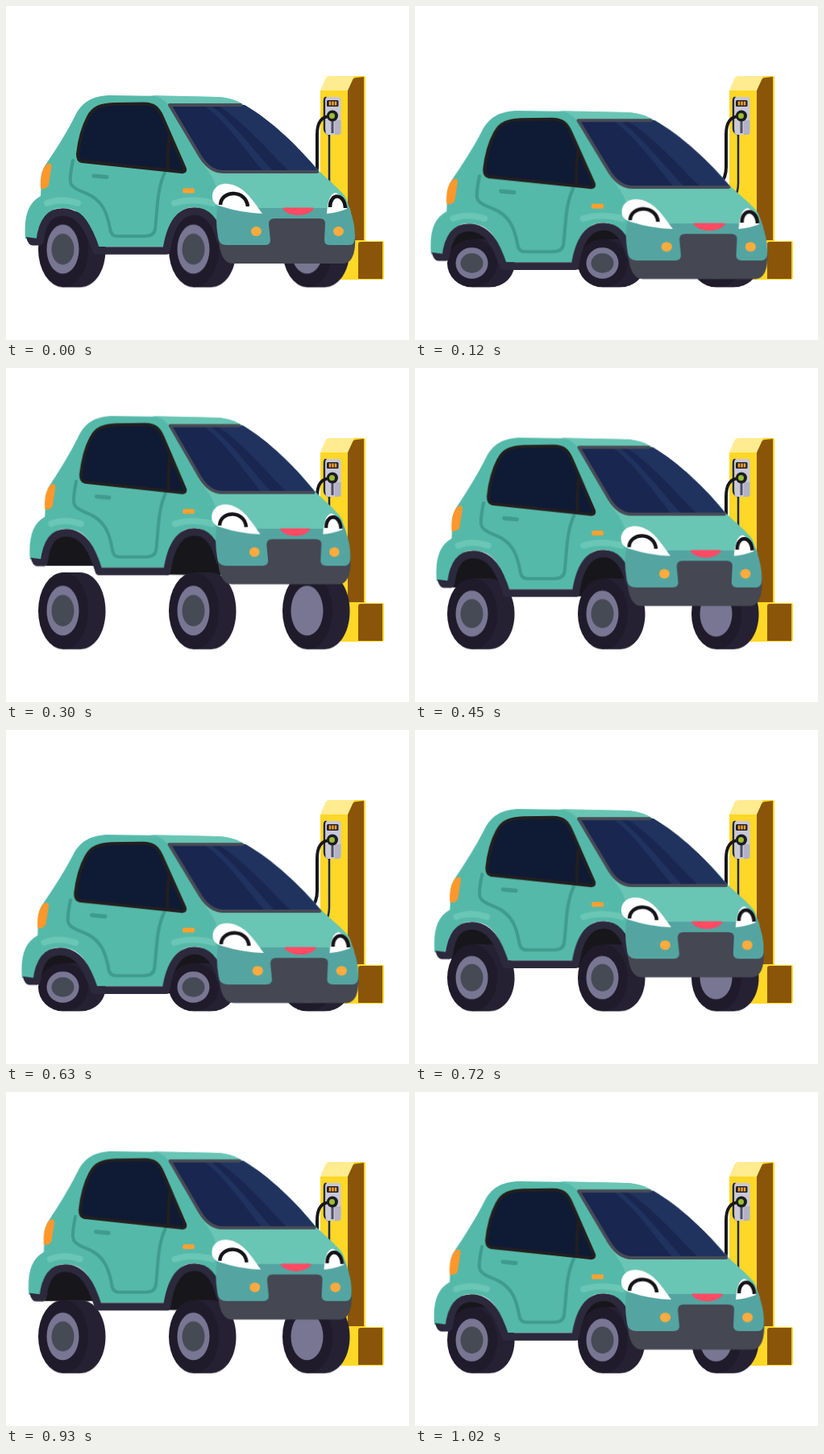
Animation, 500 px wide and 415 px high, one loop 1050 ms. Source, as an HTML page:

```html
<!DOCTYPE html>
<html lang="en">
<head>
<meta charset="utf-8">
<title>Charging car</title>
<style>
  html, body { margin: 0; width: 100%; height: 100%; overflow: hidden; background: #fff; }
  svg { display: block; width: 100%; height: 100%; }

  .body { transform-origin: 228.5px 0; animation: bounce 1050ms infinite; }
  .wheel { transform-origin: 0 349.5px; animation: squash 1050ms infinite; }

  /* Two identical bounces per loop, each with a short hold at the seam */
  @keyframes bounce {
    0%, 48.571%, 97.143%, 100% { transform: none; animation-timing-function: linear; }
    2.857%, 51.429% { transform: none; animation-timing-function: cubic-bezier(.39, .575, .565, 1); }
    10%, 58.571% { transform: translateY(20px) scaleX(1.021); animation-timing-function: cubic-bezier(.37, 0, .63, 1); }
    32%, 80.571% { transform: translateY(-55.5px) scaleX(.969); animation-timing-function: cubic-bezier(.45, .05, .7, .72); }
  }
  @keyframes squash {
    0% { transform: scaleY(.99); animation-timing-function: linear; }
    48.571%, 97.143%, 100% { transform: scaleY(.86); animation-timing-function: linear; }
    2.857%, 51.429% { transform: scaleY(.86); animation-timing-function: ease-out; }
    10%, 58.571% { transform: scaleY(.62); animation-timing-function: ease-in-out; }
    27%, 36%, 75.571%, 84.571% { transform: none; animation-timing-function: linear; }
  }

  .line { fill: none; stroke-linecap: round; stroke-linejoin: round; }
  .side { fill: #55b9a9; }
  .light { fill: #69c5b4; }
  .fascia { fill: #54a5a1; }
  .grey { fill: #454752; }
  .dark { fill: #2c293c; }
  .orange { fill: #ffab3d; }
  .white { fill: #fff; }
  .seam { stroke: #3f9c8d; stroke-width: 4; }
  .shine { stroke: #6ac6b5; stroke-width: 8; }
  .lash { stroke: #151418; stroke-width: 4.5; stroke-linecap: butt; }
</style>
</head>
<body>
<svg viewBox="0 0 500 415" preserveAspectRatio="none">
  <defs>
    <g id="tyre">
      <path fill="#252133" d="M71 254H92C110 254 123.500 275 123.500 302S110 349.500 92 349.500H71Z"/>
      <ellipse cx="71" cy="301.750" rx="31" ry="47.750" fill="#1f1b2b"/>
      <ellipse cx="70.500" cy="301.500" rx="20" ry="31" fill="#787692"/>
    </g>
    <g id="wheel">
      <use href="#tyre"/>
      <ellipse cx="70.500" cy="301.500" rx="14" ry="19.500" fill="#464a55"/>
    </g>
    <path id="glass" d="M203 123H296C330 143 362 174 388 205.500H269Q253 206 241 187Z"/>
    <clipPath id="pane"><use href="#glass"/></clipPath>
  </defs>

  <!-- charging post -->
  <path fill="#ffd726" d="M390 105L424 105L431 87H444Q446 87 446 89V292H467Q469 292 469 294V337Q469 340 466 340H390Z"/>
  <path fill="#ffeb90" d="M390 105L396 91Q398 87 401 87H432L424 105Z"/>
  <path fill="#8a5508" d="M424 105L430 92Q431 89 435 89L444 88V291H424Z"/>
  <path fill="#8a5508" d="M440 293H467V339H437V296Q437 293 440 293Z"/>
  <path class="line" stroke="#1c294c" stroke-width="2.500" d="M397 114Q395 114 395 118V152Q395 157 401 160V220Q401 230 397 238"/>
  <rect x="396.500" y="113" width="19" height="47" rx="3" fill="#c8c8da"/>
  <path fill="#b2b1c8" d="M408 142H415.500V157Q415.500 160 412 160H408Z"/>
  <path stroke="#50505d" stroke-width="3" d="M405 142V158"/>
  <rect x="398" y="117" width="14.500" height="8" rx="1.500" fill="#242127"/>
  <path stroke="#f4a22c" stroke-width="2.500" d="M402 118.500V123.500M405.500 118.500V123.500M409 118.500V123.500"/>
  <path class="line" stroke="#17161c" stroke-width="4" d="M403 137C390 137 386 146 386 160V200Q386 214 378 222"/>
  <circle cx="405" cy="136.500" r="7" fill="#1d1c20"/>
  <circle cx="404.500" cy="136.500" r="3.500" fill="#9bbd32"/>

  <!-- wheel arch interiors -->
  <g class="body" fill="#17161a">
    <path d="M44 297C46 262 58 255 70 255C92 255 104 275 110 297Z"/>
    <path d="M198 308C204 270 216 254 234 254C252 254 262 272 268 309Z"/>
  </g>

  <g class="wheel">
    <use href="#wheel"/>
    <use href="#wheel" x="162"/>
    <use href="#tyre" x="303"/>
  </g>

  <g class="body">
    <!-- shell -->
    <path class="side" d="M24 289C22 262 27 245 43 236L44 210Q46 201 50 196C60 181 74 160 86 136C94 120 107 111 130 111L262 113C280 114 290 119 300 126C330 146 362 174 388 205L420 236L425 285H264C260 262 250 250 233 250C212 250 202 270 197 299H112C105 267 94 251 69 251C51 251 43 268 41 291Z"/>
    <path class="light" d="M179 111L262 113C280 114 290 119 300 126C330 146 362 174 388 205C402 218 418 231 422 239L428 256H270C262 254 262 243 262 234C262 218 252 207 240 190L203 126Q196 113 179 111Z"/>
    <path class="dark" d="M25 287Q27 297 33 297.500H43L48 284L40 289Z"/>
    <path class="line" stroke="#2c293c" stroke-width="9.500" d="M42 292.500C45 266 55 256 70 256C92 256 103 276 112 304H199C204 270 216 255 234 255C252 255 261 271 266 291"/>
    <path class="line shine" d="M51 245Q68 238 89 245M209 245Q230 238 257 245"/>

    <!-- door -->
    <path class="line seam" d="M83 192C80 207 78 220 82 223C88 230 96 230 106 236C119 244 125 255 129 276Q130 286 138 286H172Q184 286 185 277C188 253 187 228 197 207"/>
    <path class="line" stroke="#3f9c8d" stroke-width="5" d="M109 211L125 212.500"/>
    <path fill="#0f1b35" stroke="#231f20" stroke-width="4" stroke-linejoin="round" d="M89 184C91 166 95 151 102 138C108 126 118 122.500 134 122L171 121.500C184 121.500 189 127 194 138L222 202Q223 207 217 206L94 193Q89 192 89 184Z"/>
    <path class="line" stroke="#231f20" stroke-width="4" d="M203 160Q200 180 201 203"/>
    <path fill="#ff972b" d="M50 197Q56 193 56.500 199L53 222Q51 228 43 227C42 214 44 204 50 197Z"/>
    <rect x="219" y="226.500" width="15" height="6" rx="2" fill="#ffa02e"/>

    <!-- windscreen -->
    <use href="#glass" fill="#182650"/>
    <g clip-path="url(#pane)" fill="#20335f">
      <path d="M260 122H300L390 190V210H356C325 180 294 142 260 122Z"/>
      <path d="M243 122H252C280 142 306 178 336 210H323C296 178 271 140 243 122Z"/>
    </g>
    <path class="line" stroke="#484b56" stroke-width="4" d="M291 123H203L241 187Q253 206 269 206H386"/>

    <!-- front -->
    <path class="grey" d="M263 262H430L433 285C434 300 432 320 418 320H282C268 320 262 304 263 262Z"/>
    <path class="fascia" d="M263 246Q290 252 318 251H400L424 247C431 262 433 275 433 287Q433 297 426 297H402Q395 297 395 291L396 270Q396 264 389 264H333Q326 264 326 271L328 291Q328 297 321 297H274Q264 297 263 287Q259 264 263 246Z"/>
    <ellipse class="orange" cx="310.500" cy="280" rx="6.500" ry="6"/>
    <ellipse class="orange" cx="412.500" cy="280" rx="6.500" ry="6"/>
    <path fill="#ff4a64" d="M345 250.500H380Q383 250.500 381 253Q375 260 362.500 260T344 253Q342 250.500 345 250.500Z"/>

    <!-- happy eyes -->
    <path class="white" d="M256 235C257 225 266 220 275 221C294 223 304 238 318 258Q292 257 267 249Q255 246 256 235Z"/>
    <path class="line lash" d="M266 247C267 228 298 228 300 249"/>
    <path class="white" d="M398 258C399 243 402 233 409 232Q417 236 423 248V252Q411 257 398 258Z"/>
    <path class="line lash" d="M402 250C402 232 420 232 421 251"/>
  </g>
</svg>
</body>
</html>
```
